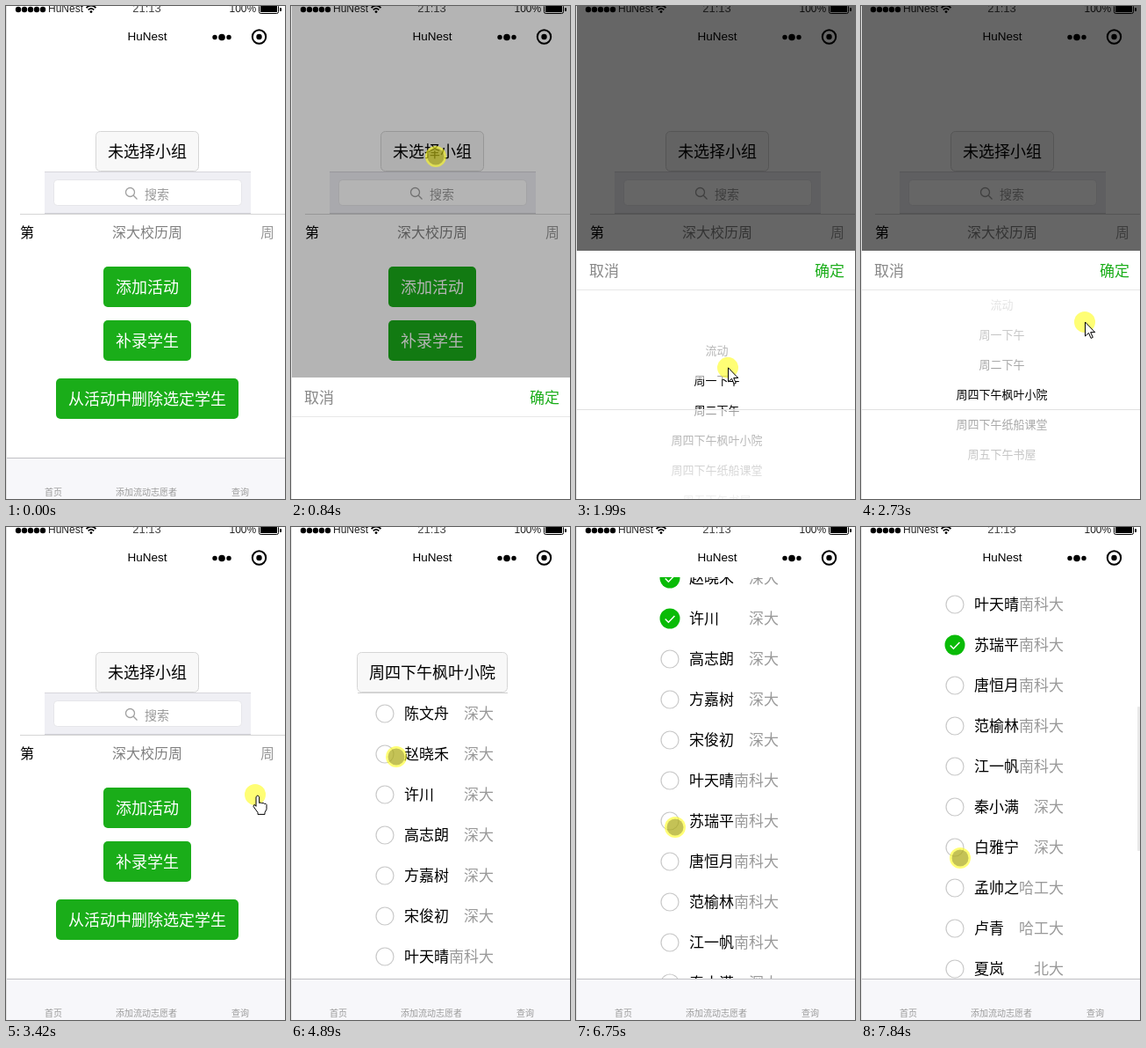
An HTML page that plays this animation: 318x560 px, repeating every 7990 ms.

```html
<!DOCTYPE html>
<html lang="zh-CN">
<head>
<meta charset="utf-8">
<title>活动</title>
<style>
html, body { margin: 0; width: 100%; height: 100%; overflow: hidden; background: #fff; }
svg { display: block; width: 318px; height: 560px; }
text { font-family: "Liberation Sans", "Noto Sans CJK SC", "Noto Sans CJK", sans-serif; white-space: pre; }
</style>
</head>
<body>
<svg id="stage" viewBox="0 0 318 560" xmlns="http://www.w3.org/2000/svg">
  <defs>
    <clipPath id="pageClip"><rect x="1" y="57" width="317" height="456"/></clipPath>
    <clipPath id="wheelClip"><rect x="1" y="45" width="317" height="237"/></clipPath>
    <linearGradient id="fadeTop" x1="0" y1="0" x2="0" y2="1">
      <stop offset="0" stop-color="#fff" stop-opacity=".95"/><stop offset="1" stop-color="#fff" stop-opacity=".6"/>
    </linearGradient>
    <linearGradient id="fadeBottom" x1="0" y1="1" x2="0" y2="0">
      <stop offset="0" stop-color="#fff" stop-opacity=".95"/><stop offset="1" stop-color="#fff" stop-opacity=".6"/>
    </linearGradient>
  </defs>
  <rect width="318" height="560" fill="#fff"/>
  <g clip-path="url(#pageClip)">
    <g id="page"><g id="home"></g><g id="list"></g></g>
    <rect id="thumb" x="315" width="3" height="164" rx="1"/>
  </g>
  <g id="chrome"></g>
  <rect id="shade" x="1" width="317" height="560"/>
  <g id="sheet"></g>
  <g id="cursor">
    <circle r="12" fill="#fffd20" fill-opacity=".62"/>
    <circle id="dot" r="9.5" fill="#1c1800" fill-opacity=".26"/>
    <path id="arrow" d="M.5 0v16l4-3.6 2.6 6 2.2-1-2.6-5.8h5z" fill="#fff" stroke="#000"/>
    <path id="hand" d="M1 2.5q1.8-3 3.6 0v7q1.5-1.2 3 .3 1.5-1 3 .6 1.7-.6 2.4 1v5l-2 4v2h-8v-2l-5-7q0-2.5 2-1.6l1 1.5z" fill="#fff" stroke="#000"/>
  </g>
  <rect width="1" height="560" fill="#e3e3e3"/>
</svg>
<script>
const LOOP = 7990, ROW = 46, ITEM = 34;
const $ = id => document.getElementById(id);
const show = (el, on) => el.setAttribute('display', on ? 'inline' : 'none');
const move = (el, x, y) => el.setAttribute('transform', `translate(${x} ${y})`);

// y is the vertical middle of the glyphs
const label = (s, x, y, size, fill, anchor = 'start') =>
  `<text x="${x}" y="${y + size * 0.37}" font-size="${size}" fill="${fill}" text-anchor="${anchor}">${s}</text>`;
const rect = (x, y, w, h, fill, extra = '') =>
  `<rect x="${x}" y="${y}" width="${w}" height="${h}" fill="${fill}" ${extra}/>`;
const hline = (x1, x2, y, color) => rect(x1, y, x2 - x1, 1, color);

function button(s, y, green) {
  const w = s.length * 18 + 28, x = 161 - w / 2;
  const box = green
    ? rect(x, y, w, 46, '#1aad19', 'rx="5"')
    : rect(x + 0.5, y + 0.5, w - 1, 45, '#f8f8f8', 'rx="5" stroke="#d6d6d6"');
  return box + label(s, 161, y + 23.5, 18, green ? '#fff' : '#000', 'middle');
}

const GROUPS = ['流动', '周一下午', '周二下午', '周四下午枫叶小院', '周四下午纸船课堂', '周五下午书屋'];
const PEOPLE = [
  ['陈文舟', '深大'], ['赵晓禾', '深大'], ['许川', '深大'], ['高志朗', '深大'],
  ['方嘉树', '深大'], ['宋俊初', '深大'], ['叶天晴', '南科大'], ['苏瑞平', '南科大'],
  ['唐恒月', '南科大'], ['范榆林', '南科大'], ['江一帆', '南科大'], ['秦小满', '深大'],
  ['白雅宁', '深大'], ['孟帅之', '哈工大'], ['卢青', '哈工大'], ['夏岚', '北大']
];
const TAPS = { 1: 5040, 2: 5360, 7: 6900 };

$('home').innerHTML =
  button('未选择小组', 142) +
  rect(44, 188, 235, 48, '#efeff4') + hline(44, 279, 188, '#d7d6dc') + hline(44, 279, 235, '#d0d0d6') +
  rect(54.5, 197.5, 214, 29, '#fff', 'rx="4" stroke="#e6e6ea"') +
  '<g fill="none" stroke="#a0a0a0" stroke-width="1.3"><circle cx="141.5" cy="211.5" r="5"/><path d="M145.3 215.3l4.2 4.2"/></g>' +
  label('搜索', 158, 213.5, 14, '#999') +
  hline(16, 318, 236, '#d5d5d5') +
  label('第', 16, 257.3, 16, '#000') + label('深大校历周', 161, 257.3, 16, '#808080', 'middle') +
  label('周', 290, 257.3, 16, '#999') +
  button('添加活动', 296, true) + button('补录学生', 357, true) + button('从活动中删除选定学生', 423, true);

$('list').innerHTML = button(GROUPS[3], 142) + hline(76, 247, 188, '#d0d0d0') +
  PEOPLE.map(([name, school], i) => {
    const y = 212 + ROW * i;
    return rect(76, y - 23, 170, ROW, '#ececec', `id="glow${i}"`) +
      `<circle cx="107" cy="${y}" r="10" fill="#fff" stroke="#c9c9c9" stroke-width="1.2"/>` +
      `<g id="check${i}"><circle cx="107" cy="${y}" r="11.5" fill="#09bb07"/>` +
      `<path d="M101.7 ${y + 0.5}l3.7 3.7 7-7.2" fill="none" stroke="#fff" stroke-width="1.5"/></g>` +
      label(name, 129, y, 17, '#000') + label(school, 231, y, 17, '#999', 'end');
  }).join('');

const dots = [14, 21, 28, 35, 42].map(x => `<circle cx="${x}" cy="4" r="3.2"/>`).join('');
$('chrome').innerHTML =
  rect(1, 0, 317, 57, '#fff') + dots +
  label('HuNest', 48, 3, 12, '#222') +
  '<g fill="none" stroke="#000" stroke-width="1.7"><path d="M91.5 2q5.5-5 11 0M93.7 4.4q3.3-3 6.6 0"/></g><circle cx="97" cy="6.6" r="1.4"/>' +
  label('21:13', 160.5, 2.5, 13, '#444', 'middle') +
  label('100%', 254.5, 3, 12, '#222') +
  rect(288.5, -1.5, 22, 10, '#fff', 'rx="2" stroke="#000"') + rect(290, 0, 19, 7, '#000') + rect(312, 2, 2, 4, '#000', 'rx="1"') +
  label('HuNest', 161, 34.3, 13.5, '#000', 'middle') +
  '<circle cx="238" cy="35.5" r="2.7"/><circle cx="246" cy="35.5" r="3.8"/><circle cx="254" cy="35.5" r="2.7"/>' +
  '<circle cx="288.5" cy="35" r="7.7" fill="none" stroke="#000" stroke-width="2"/><circle cx="288.5" cy="35" r="3.2"/>' +
  rect(1, 513, 317, 47, '#f7f7fa') + hline(1, 318, 513, '#c0c0c4') +
  [['首页', 54], ['添加流动志愿者', 160], ['查询', 267]].map(([s, x]) => label(s, x, 551.8, 10, '#999', 'middle')).join('');

$('sheet').innerHTML =
  rect(1, 0, 317, 282, '#fff') + label('取消', 15, 23, 17, '#888') +
  label('确定', 306, 23, 17, '#1aad19', 'end') + hline(1, 318, 44, '#e8e8e8') +
  '<g clip-path="url(#wheelClip)"><g id="wheel">' +
  GROUPS.map((s, i) => label(s, 160.5, 163 + ITEM * i, 13, '#000', 'middle')).join('') + '</g>' +
  rect(1, 45, 317, 101, 'url(#fadeTop)') + rect(1, 180, 317, 102, 'url(#fadeBottom)') + '</g>' +
  hline(1, 318, 180, '#e2e2e2');

// keys: [time, value, value...], held outside the range
const linear = u => u, smooth = u => u * u * (3 - 2 * u);
function track(t, keys, ease = linear) {
  if (t <= keys[0][0]) return keys[0].slice(1);
  const n = keys.findIndex(k => k[0] > t);
  if (n < 0) return keys[keys.length - 1].slice(1);
  const a = keys[n - 1], b = keys[n], u = ease((t - a[0]) / (b[0] - a[0]));
  return a.slice(1).map((v, i) => v + (b[i + 1] - v) * u);
}

const DRAG = [[1460, 0], [1760, 34], [1914, 34], [1990, 50], [2400, 102]];
// while the wheel is dragged the pointer stays put here and is lifted by the drag
const POINTER = [
  [70, 221, 392], [530, 165, 171], [1000, 165, 171], [1450, 173, 461],
  [2400, 173, 461], [2730, 255, 461], [2740, 255, 461], [3190, 284, 406], [3750, 284, 406],
  [4200, 127, 329], [4360, 127, 329], [4590, 120, 354], [4740, 120, 354], [4890, 120, 363],
  [5120, 120, 363], [5360, 120, 411], [6370, 120, 411], [6600, 113, 443],
  [6980, 113, 443], [7290, 113, 470], [7370, 113, 470], [7510, 113, 478]
];
const SCROLL = [[5600, 0], [5840, 100], [6140, 200], [6990, 200], [7140, 300], [7290, 400]];
const THUMB = [[5669, 0], [5670, 1], [6380, 1], [6700, 0], [7049, 0], [7050, 1], [7690, 1], [8010, 0]];

function draw(t) {
  const [open] = track(t, [[694, 0], [994, 1]]);
  const picking = t >= 694 && t < 3420, listed = t >= 3500;
  show($('home'), !listed);
  show($('list'), listed);
  show($('sheet'), picking);
  show($('shade'), picking);
  $('shade').setAttribute('fill-opacity', 0.6 * open);
  move($('sheet'), 0, Math.round(560 - 282 * open));

  const [drag] = track(t, DRAG);
  move($('wheel'), 0, -drag);

  const [top] = track(t, SCROLL, smooth);
  move($('page'), 0, -top);
  $('thumb').setAttribute('y', 60 + 0.36 * top);
  $('thumb').setAttribute('fill-opacity', 0.16 * track(t, THUMB)[0]);

  PEOPLE.forEach((_, i) => {
    const tap = TAPS[i] ?? Infinity;
    show($('glow' + i), t >= tap && t < tap + 80);
    show($('check' + i), t >= tap + 80);
  });

  const [x, y] = track(t, POINTER, smooth);
  move($('cursor'), x, y - drag);
  show($('cursor'), t >= 70);
  show($('dot'), t < 1180 || t >= 3590);
  show($('arrow'), t >= 1180 && t < 3040);
  show($('hand'), t >= 3040 && t < 3590);
}

function tick() {
  draw(performance.now() % LOOP);
  requestAnimationFrame(tick);
}
tick();
</script>
</body>
</html>
```
